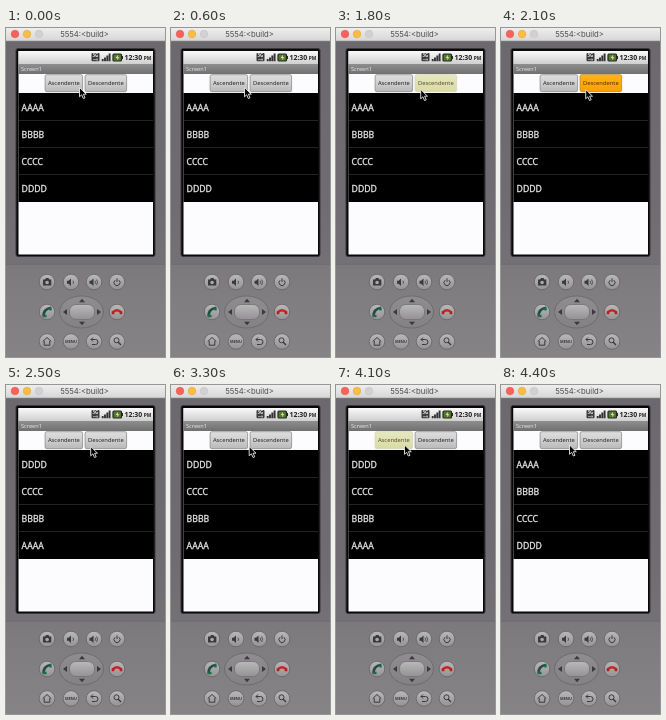
An HTML page for the animation above (4500 ms loop, 159 by 329 pixels).

```html
<!DOCTYPE html>
<html lang="es">
<head>
<meta charset="utf-8">
<title>Sorted list</title>
<style>
html, body { margin: 0; width: 100%; height: 100%; overflow: hidden; background: #747276; }
svg { display: block; width: 100vw; height: 100vh; }
text { font-family: "Noto Sans", "Open Sans", sans-serif; }
.title { font-family: Inter, "Liberation Sans", sans-serif; }
</style>
</head>
<body>
<svg viewBox="0 0 159 329" preserveAspectRatio="none">
  <defs>
    <linearGradient id="bar" x2="0" y2="1"><stop stop-color="#eeeeee"/><stop offset="1" stop-color="#d6d6d6"/></linearGradient>
    <linearGradient id="body" x2="0" y2="1"><stop stop-color="#6b696d"/><stop offset=".5" stop-color="#6e6c70"/><stop offset="1" stop-color="#7a787b"/></linearGradient>
    <linearGradient id="panel" x2="0" y2="1"><stop stop-color="#7b797c"/><stop offset=".4" stop-color="#807e81"/><stop offset="1" stop-color="#858386"/></linearGradient>
    <linearGradient id="status" x2="0" y2="1"><stop stop-color="#fafafa"/><stop offset="1" stop-color="#cfcfcf"/></linearGradient>
    <linearGradient id="head" x2="0" y2="1"><stop stop-color="#8e8e8e"/><stop offset="1" stop-color="#707070"/></linearGradient>
    <linearGradient id="grey" x2="0" y2="1"><stop stop-color="#dedede"/><stop offset=".5" stop-color="#cfcfcf"/><stop offset="1" stop-color="#b8b8b8"/></linearGradient>
    <linearGradient id="orange" x2="0" y2="1"><stop stop-color="#ffb41c"/><stop offset="1" stop-color="#fa9f00"/></linearGradient>
    <linearGradient id="pale" x2="0" y2="1"><stop stop-color="#e6e8c0"/><stop offset="1" stop-color="#d8daa4"/></linearGradient>
    <linearGradient id="key" x2="0" y2="1"><stop stop-color="#bab9ba"/><stop offset="1" stop-color="#949294"/></linearGradient>
    <linearGradient id="pad" x2="0" y2="1"><stop stop-color="#8f8d8f"/><stop offset="1" stop-color="#838184"/></linearGradient>
  </defs>

  <rect width="159" height="329" fill="url(#body)"/>
  <rect y="236" width="159" height="93" fill="url(#panel)"/>
  <path d="M0 236.300H159" stroke="#69676a" stroke-width=".7"/>
  <rect width="159" height="13" fill="url(#bar)"/>
  <path d="M0 12.800H159" stroke="#a4a4a4" stroke-width=".6"/>
  <g stroke-width=".5">
    <circle cx="9" cy="6" r="3.800" fill="#fc605b" stroke="#dc4a45"/>
    <circle cx="21" cy="6" r="3.800" fill="#fdbc40" stroke="#dba034"/>
    <circle cx="33" cy="6" r="3.800" fill="#d2d0d2" stroke="#c2c0c2"/>
  </g>
  <text class="title" x="78.500" y="9.200" font-size="7.700" text-anchor="middle" fill="#4c4c4c">5554:&lt;build&gt;</text>

  <rect x="10" y="20.500" width="139" height="208" rx="2" fill="#080808" stroke="#39383a"/>
  <rect x="12.500" y="23" width="134.500" height="203.500" fill="#fcfbfe"/>
  <rect x="12.500" y="23" width="134.500" height="13" fill="url(#status)"/>
  <rect x="12.500" y="36" width="134.500" height="10" fill="url(#head)"/>
  <text x="15" y="42.700" font-size="5.600" font-weight="500" fill="#e6e6e6">Screen1</text>
  <text x="118.500" y="32.300" font-size="6.900" font-weight="700" fill="#222">12:30<tspan dx="1.400" font-size="4.800">PM</tspan></text>

  <g>
    <rect x="85.500" y="25" width="8" height="8.300" rx="1" fill="#3a3a3a"/>
    <text x="86.600" y="29.400" font-size="4.400" font-weight="700" fill="#eee">3G</text>
    <path d="M87 31.600H91.500M90.500 30.400L92 31.600L90.500 32.800" fill="none" stroke="#ddd" stroke-width=".6"/>
    <path d="M96.700 33.300V31M99 33.300V29.500M101.300 33.300V27.500M103.600 33.300V25.500" stroke="#333" stroke-width="1.900"/>
    <rect x="107" y="26" width="8.500" height="7" rx="1" fill="#557a26" stroke="#262626" stroke-width="1.200"/>
    <rect x="115.900" y="28" width="1.100" height="3" fill="#262626"/>
    <path d="M112 26.800L109.700 30H111.500L110.800 32.500L113.400 29.300H111.700Z" fill="#dfe8c4"/>
  </g>

  <g id="buttons"></g>
  <rect x="12.500" y="65" width="134.500" height="109" fill="#000"/>
  <path d="M13 92.500H147M13 119.500H147M13 146.500H147" stroke="#2b2b2b" stroke-width=".8"/>
  <g id="rows" font-size="8.700" fill="#e4e4e4" stroke="#e4e4e4" stroke-width=".3"></g>

  <g id="keys" fill="url(#key)" stroke="#656366" stroke-width=".8"></g>
  <g fill="#3a393b">
    <path d="M37 251.500H39L40 250H42.500L43.300 251.500H45.300V257.500H37Z"/>
    <circle cx="41.100" cy="254.500" r="1.800" fill="#aaa"/>
    <path id="speaker" d="M61 252.700H62.600L65 250.500V258L62.600 255.800H61Z"/>
    <use href="#speaker" x="22.500"/>
    <text x="65" y="315" font-size="3.900" font-weight="700" text-anchor="middle">MENU</text>
  </g>
  <g fill="none" stroke="#3a393b">
    <path d="M67 252.700Q68 254.200 67 255.800M89 252.700Q90 254.200 89 255.800M90.600 251.500Q92.400 254.200 90.600 257" stroke-width=".8"/>
    <path d="M109.200 252.200A3 3 0 1 0 112.800 252.200M111 250.300V254"/>
    <path d="M36.700 313.500L41 309.500L45.300 313.500M38.200 313V317.200H43.800V313"/>
    <path d="M86 316.500H89.500A2.500 2.500 0 0 0 89.500 311.500H85M87 309.500L85 311.500L87 313.500"/>
    <path d="M112 314L115 317" stroke-width="1.400"/>
    <circle cx="110.500" cy="312.300" r="2.500"/>
  </g>
  <g fill="none">
    <path d="M37.500 288.500Q37.500 281 45 279.800" stroke="#214d42" stroke-width="2.600"/>
    <path d="M37 288H40.500M44.500 279.300V282.500" stroke="#1d6b45" stroke-width="2.400"/>
    <path d="M106.500 284.500Q111 280 115.500 284.500" stroke="#c5251f" stroke-width="2.400"/>
    <path d="M107 283.500V286.300M115 283.500V286.300" stroke="#b4211c" stroke-width="2.600"/>
  </g>
  <g>
    <ellipse cx="75.500" cy="284" rx="22" ry="16" fill="url(#pad)" stroke="#686669" stroke-width=".8"/>
    <rect x="63.500" y="276.500" width="25" height="15" rx="6.500" fill="url(#key)" stroke="#747275" stroke-width=".8"/>
    <path d="M76 270.700L79 274.300H73ZM76 297.300L79 293.700H73ZM57 284L61 281V287ZM95 284L91 281V287Z" fill="#3a393b"/>
  </g>

  <path id="cursor" d="M0 0V9.300L2.200 7.300L3.800 11L5.500 10.300L3.900 6.700H6.800Z" fill="#000" stroke="#e8e8e8" stroke-width=".9"/>
</svg>
<script>
const NS = "http://www.w3.org/2000/svg";
const LOOP = 4500, STEP = 100;
const $ = id => document.getElementById(id);

// Border and label colours for each button state
const LOOKS = {
  grey: ["#8c8c8c", "#222"],
  pale: ["#d6d6b4", "#5c4a30"],
  orange: ["#c48420", "#4a3000"]
};

function add(parent, tag, attrs, text = "") {
  const el = document.createElementNS(NS, tag);
  for (const k in attrs) el.setAttribute(k, attrs[k]);
  el.textContent = text;
  parent.appendChild(el);
  return el;
}

function makeButton(x, width, name) {
  const face = add($("buttons"), "rect", {
    x, y: 46.7, width, height: 17, rx: 1.8, "stroke-width": .8
  });
  const label = add($("buttons"), "text", {
    x: x + width / 2, y: 56.7, "font-size": 5.8, "text-anchor": "middle"
  }, name);
  return { face, label };
}

const ascending = makeButton(39.1, 37.5, "Ascendente");
const descending = makeButton(79.1, 41.5, "Descendente");
const rows = [0, 1, 2, 3].map(i => add($("rows"), "text", { x: 15.6, y: 82.8 + 27 * i }));

for (const y of [254, 284, 313.5])
  for (const x of y === 284 ? [41, 111] : [41, 65, 88, 111])
    add($("keys"), "circle", { cx: x, cy: y, r: 7.8 });

// Cursor path: time, x, y
const path = [[0, 73.5, 59.5], [900, 73.5, 59.5], [1300, 82.9, 61], [1500, 84.7, 61.5],
  [3100, 84.7, 61.5], [3300, 78.2, 61.5], [3700, 68.5, 60], [LOOP, 68.5, 60]];

function cursorAt(t) {
  const i = path.findIndex(p => p[0] > t);
  const [t0, x0, y0] = path[i - 1], [t1, x1, y1] = path[i];
  const u = (t - t0) / (t1 - t0);
  const k = t0 === 1300 || t0 === 3300 ? 1 - (1 - u) ** 2 : u;
  return [x0 + (x1 - x0) * k, y0 + (y1 - y0) * k];
}

function paint({ face, label }, t, start, end) {
  const state = t < start || t >= end ? "grey" : t < start + 200 ? "pale" : "orange";
  const [border, ink] = LOOKS[state];
  face.setAttribute("fill", `url(#${state})`);
  face.setAttribute("stroke", border);
  label.setAttribute("fill", ink);
}

function draw(time) {
  const t = Math.floor((time % LOOP) / STEP) * STEP;
  const order = t >= 2200 && t < 4400 ? "DCBA" : "ABCD";
  rows.forEach((row, i) => { row.textContent = order[i].repeat(4); });
  paint(descending, t, 1700, 2200);
  paint(ascending, t, 4000, 4400);
  $("cursor").setAttribute("transform", `translate(${cursorAt(t)})`);
}

const start = performance.now();
function tick() {
  draw(performance.now() - start);
  requestAnimationFrame(tick);
}
tick();
</script>
</body>
</html>
```
